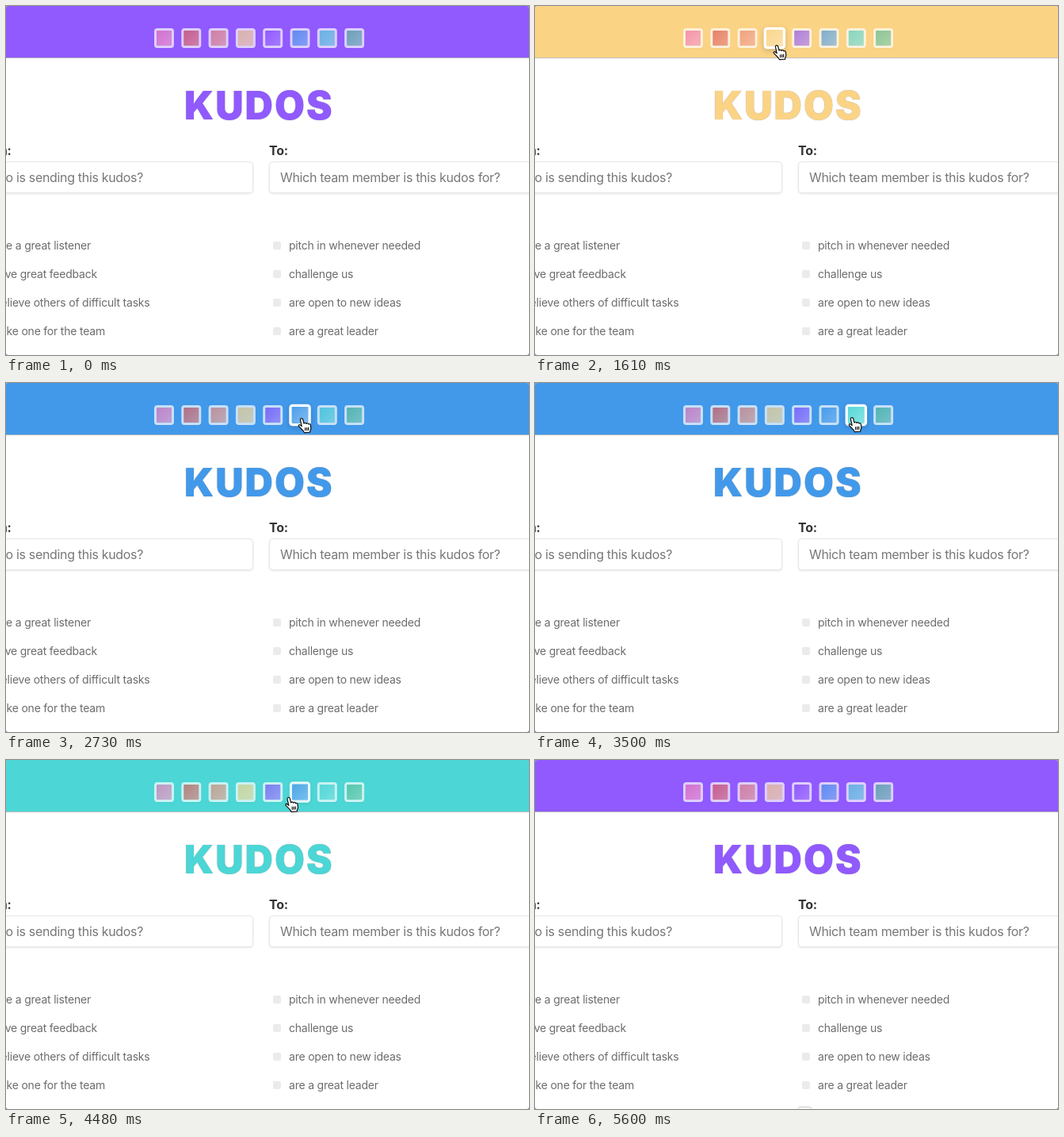
An HTML page for the animation above (5.67 s loop, 660 px wide and 440 px high).

```html
<!DOCTYPE html>
<html lang="en">
<head>
<meta charset="utf-8">
<title>Kudos</title>
<style>
  html, body { margin: 0; width: 100%; height: 100%; overflow: hidden; background: #8a8a8a; }
  svg { display: block; font-family: Inter, "Open Sans", sans-serif; border-radius: 3px; }
  #title { font-size: 49px; font-weight: 900; letter-spacing: 2px; text-shadow: 0 0 1px rgba(60, 50, 50, .5); }
  .label { font-size: 16px; font-weight: 700; fill: #333; letter-spacing: -.3px; }
  .hint { font-size: 16px; fill: #777; letter-spacing: -.33px; }
  .item { font-size: 14px; fill: #6c6c6c; letter-spacing: -.21px; }
  .end { text-anchor: end; }
  .field { fill: #fff; stroke: #e6e6e6; filter: drop-shadow(0 1px 1px rgba(0, 0, 0, .1)); }
  #header { filter: drop-shadow(0 1px .5px rgba(0, 0, 0, .25)); }
</style>
</head>
<body>
<svg width="660" height="440" viewBox="0 0 660 440">
  <defs>
    <linearGradient id="shine" x2="1" y2="1">
      <stop stop-color="#fff" stop-opacity="0"/>
      <stop offset="1" stop-color="#fff" stop-opacity=".3"/>
    </linearGradient>
    <path id="beamLine" d="M-3-8Q0-8 0-6Q0-8 3-8M0-6V6M-3 8Q0 8 0 6Q0 8 3 8M-2 2H2"/>
  </defs>
  <rect width="660" height="440" fill="#fff"/>
  <rect id="header" width="660" height="65"/>
  <g id="swatches"></g>
  <text id="title" x="225" y="143">KUDOS</text>
  <text class="label end" x="6.5" y="188">From:</text>
  <text class="label" x="332" y="188">To:</text>
  <rect class="field" x="-20.5" y="196.5" width="332" height="39" rx="4"/>
  <rect class="field" x="332.5" y="196.5" width="340" height="39" rx="4"/>
  <text class="hint end" x="173" y="222">Who is sending this kudos?</text>
  <text class="hint" x="346" y="222">Which team member is this kudos for?</text>
  <g id="list"></g>
  <rect id="nextBox" x="332.5" y="437.5" width="16" height="16" rx="2" fill="#fff" stroke="#c8c8c8"/>
  <g id="cursor" stroke-linejoin="round" stroke-linecap="round">
    <path id="hand" fill="#fff" stroke="#111" stroke-width="1.2" d="M-1.6 1.4C-1.8-.8 1.2-1.2 1.7 1L3 6.2C3.6 4.8 5.6 5 5.9 6.4C6.8 5.2 8.6 5.6 8.8 7C9.8 6.2 11.3 6.9 11.4 8.4L11.8 12C11.9 14 10.6 15 10.5 17.2L3.4 17.6C2.5 14.6-1.2 12.4-3.6 9.4C-4.4 7.8-2.4 6.8-.8 8.8L.2 9.6ZM4.6 11.5V14.6M6.7 11.4V14.5M8.7 11.2V14.3"/>
    <g id="beam" fill="none">
      <use href="#beamLine" stroke="#fff" stroke-width="3"/>
      <use href="#beamLine" stroke="#222" stroke-width="1.2"/>
    </g>
    <path id="arrow" fill="#111" stroke="#fff" d="M0 0V15L3.4 12L5.8 17.4L8.4 16.2L6 11H10.6Z"/>
  </g>
</svg>
<script>
const LOOP = 5670, FADE = 130;
const GAP = 34.3, FIRST_X = 199.5, ROW_Y = 40.5;
const $ = id => document.getElementById(id);
const clamp = v => Math.max(0, Math.min(1, v));
const mix = (a, b, k) => a + (b - a) * k;
const easeOut = k => 1 - (1 - k) ** 3;
const blend = (a, b, k) => `color-mix(in srgb, ${a}, ${b} ${100 * k}%)`;

const colors = ['#f074b6', '#dc5652', '#eb8874', '#fbd385', '#905aff', '#4299ea', '#4cd6d6', '#50bc96'];
const PURPLE = 4;

// The pointer reaches each stop at its time, after a journey of the given length
const stop = (at, journey, x, y) => ({ at, journey, x, y });
const stops = [
  stop(0, 0, 345, 470),
  stop(840, 280, 340, 99),
  stop(1400, 560, 305, 50),
  stop(2590, 560, 373, 45),
  stop(3500, 280, 400, 44),
  stop(5110, 980, 341, 49),
  stop(5600, 240, 340, 446)];

// A stop inside the header clicks the nearest swatch
const clicks = stops.filter(s => s.y < 66)
  .map(s => ({ at: s.at, color: colors[Math.round((s.x - FIRST_X) / GAP)] }));

const square = (size, radius, fill) =>
  `<rect x="${-size / 2}" y="${-size / 2}" width="${size}" height="${size}" rx="${radius}" fill="${fill}"/>`;
$('swatches').innerHTML = colors.map((c, i) => {
  const base = i === PURPLE ? c : blend(c, 'white', .06);
  return `<g>${square(25, 4, '#fff')}<g style="color:${base}">${square(19, 1, 'currentColor')}</g>${square(19, 1, 'url(#shine)')}</g>`;
}).join('');
const swatches = [...$('swatches').children];

// Left text with its right edge, then right text
const items = [
  ['are a great listener', 107, 'pitch in whenever needed'],
  ['give great feedback', 115, 'challenge us'],
  ['relieve others of difficult tasks', 181.5, 'are open to new ideas'],
  ['take one for the team', 125, 'are a great leader']];
$('list').innerHTML = items.map(([left, edge, right], i) => {
  const y = 302 + 36 * i;
  return `<text class="item end" x="${edge}" y="${y + 5}">${left}</text>
    <rect x="337" y="${y - 5}" width="10" height="10" rx="2" fill="#ebebeb"/>
    <text class="item" x="357" y="${y + 5}">${right}</text>`;
}).join('');

function themeAt(t) {
  const n = clicks.filter(c => c.at <= t).length;
  if (!n) return colors[PURPLE];
  const from = n > 1 ? clicks[n - 2].color : colors[PURPLE];
  return blend(from, clicks[n - 1].color, clamp((t - clicks[n - 1].at) / FADE));
}

function pointerAt(t) {
  const n = stops.filter(s => s.at <= t).length;
  const from = stops[n - 1], to = stops[n] || from;
  const k = to === from ? 1 : easeOut(clamp(1 - (to.at - t) / to.journey));
  return [mix(from.x, to.x, k), mix(from.y, to.y, k)];
}

function draw(t) {
  const [x, y] = pointerAt(t);
  $('header').style.fill = $('title').style.fill = themeAt(t);

  let over = false;
  swatches.forEach((s, i) => {
    const cx = FIRST_X + GAP * i;
    const hover = clamp((17 - Math.max(Math.abs(x - cx), Math.abs(y - ROW_Y))) / 5);
    over ||= hover > .5;
    s.setAttribute('transform', `translate(${cx} ${ROW_Y}) scale(${1 + .1 * hover})`);
    s.style.opacity = mix(.7, 1, hover);
    s.style.filter = `drop-shadow(0 ${1 + hover}px ${1 + 2 * hover}px rgba(0,0,0,${mix(.05, .18, hover)}))`;
  });

  const shape = over || y > 290 ? 'hand' : y > 80 ? 'beam' : 'arrow';
  for (const id of ['hand', 'beam', 'arrow']) $(id).style.display = id === shape ? '' : 'none';
  $('cursor').setAttribute('transform', `translate(${x} ${y})`);
  $('nextBox').style.display = y > 440 && y < 455 ? '' : 'none';
}

const begin = performance.now();
function tick() {
  draw((performance.now() - begin) % LOOP);
  requestAnimationFrame(tick);
}
tick();
</script>
</body>
</html>
```
